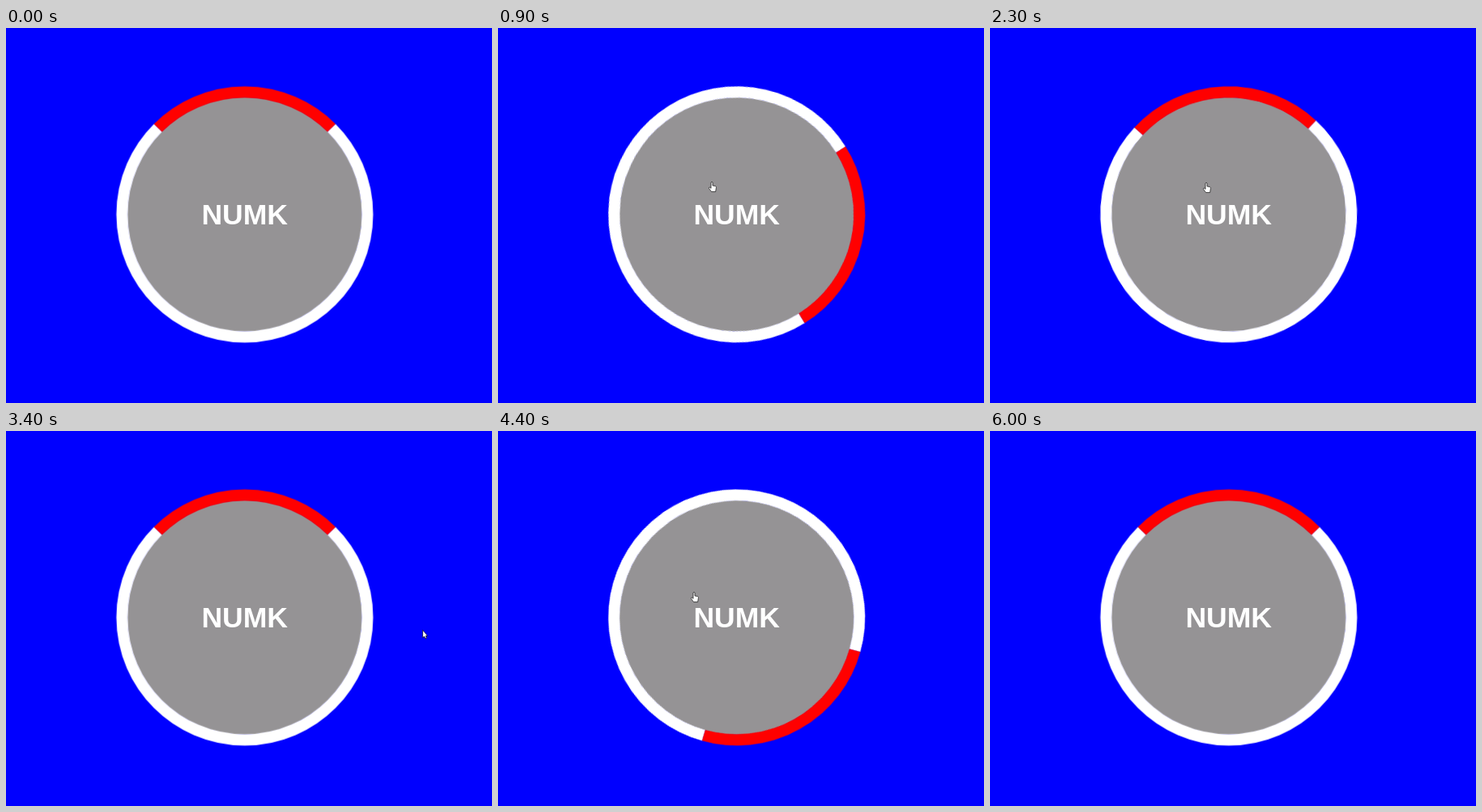
An HTML page for the animation above (6600 ms loop, 600 px wide and 464 px high).

```html
<!DOCTYPE html>
<html lang="en">
<head>
<meta charset="utf-8">
<title>Hover ring</title>
<style>
  html, body { margin: 0; width: 100%; height: 100%; overflow: hidden; background: #00f; }
  svg { display: block; width: 600px; height: 464px; }
  text { font: bold 35.5px "Liberation Sans", Arial, sans-serif; fill: #fff; text-anchor: middle; }
  .band { fill: none; stroke-width: 14; }
  .cursor { fill: #fff; stroke: #111; stroke-width: .7; stroke-linejoin: round; }
</style>
</head>
<body>
<svg viewBox="0 0 600 464">
  <g transform="translate(294.7 230.7)">
    <circle r="145" fill="#959395"/>
    <g id="ring">
      <path class="band" stroke="#fff" d="M107.13-107.13A151.5 151.5 0 1 1-107.13-107.13"/>
      <path class="band" stroke="#f00" d="M-107.13-107.13A151.5 151.5 0 0 1 107.13-107.13"/>
    </g>
  </g>
  <text x="294.7" y="243.3">NUMK</text>
  <path id="arrow" class="cursor" d="M-.5-.5V9L1.5 7.2L2.8 10L4.3 9.4L3.2 6.7H5.5Z"/>
  <path id="hand" class="cursor" d="M-1 1Q0-.6 1 1V5L4.4 5.6Q5.6 6 5.4 7.6L4.6 12.6H-.4L-3.6 8.4Q-3.8 7-2.4 7.2L-1 8.4Z"/>
</svg>
<script>
const LOOP = 6600, STEP = 100, SPIN = 2000;
const CENTER = { x: 294.7, y: 230.7 }, RADIUS = 158.5;
const [ring, arrow, hand] = ['ring', 'arrow', 'hand'].map(id => document.getElementById(id));

// Each hover turns the ring once; leaving resets it
const hovers = [{ from: 508, to: 3200 }, { from: 3891, to: 5600 }];
const spin = ring.animate(
  { transform: ['rotate(0deg)', 'rotate(360deg)'] },
  { duration: SPIN, easing: 'ease', fill: 'both' }
);
spin.pause();

// The pointer glides to each stop and rests there until the next glide
const entry = { x: 569, y: 232 };
const glides = [
  { from: 400, to: 900, x: 264, y: 190 },
  { from: 900, to: 1500, x: 267, y: 191 },
  { from: 3140, to: 3700, x: 560, y: 257 },
  { from: 3750, to: 4400, x: 242, y: 199 },
  { from: 5480, to: 5600, x: 252, y: 29 }
];
const visible = { from: 400, to: 5700 };

const during = (span, time) => time >= span.from && time < span.to;
const easeOut = p => 1 - (1 - p) ** 3;

function pointerAt(time) {
  let { x, y } = entry;
  for (const glide of glides) {
    const part = (time - glide.from) / (glide.to - glide.from);
    const done = easeOut(Math.min(1, Math.max(0, part)));
    x += (glide.x - x) * done;
    y += (glide.y - y) * done;
  }
  return { x, y };
}

function draw() {
  const time = Math.floor(performance.now() % LOOP / STEP) * STEP;
  const hover = hovers.find(span => during(span, time));
  spin.currentTime = hover ? Math.min(SPIN, time - hover.from) : 0;

  const { x, y } = pointerAt(time);
  const shown = during(visible, time);
  const inside = Math.hypot(x - CENTER.x, y - CENTER.y) < RADIUS;
  hand.style.display = shown && inside ? '' : 'none';
  arrow.style.display = shown && !inside ? '' : 'none';
  for (const cursor of [hand, arrow]) cursor.setAttribute('transform', `translate(${x} ${y})`);
  requestAnimationFrame(draw);
}
draw();
</script>
</body>
</html>
```
